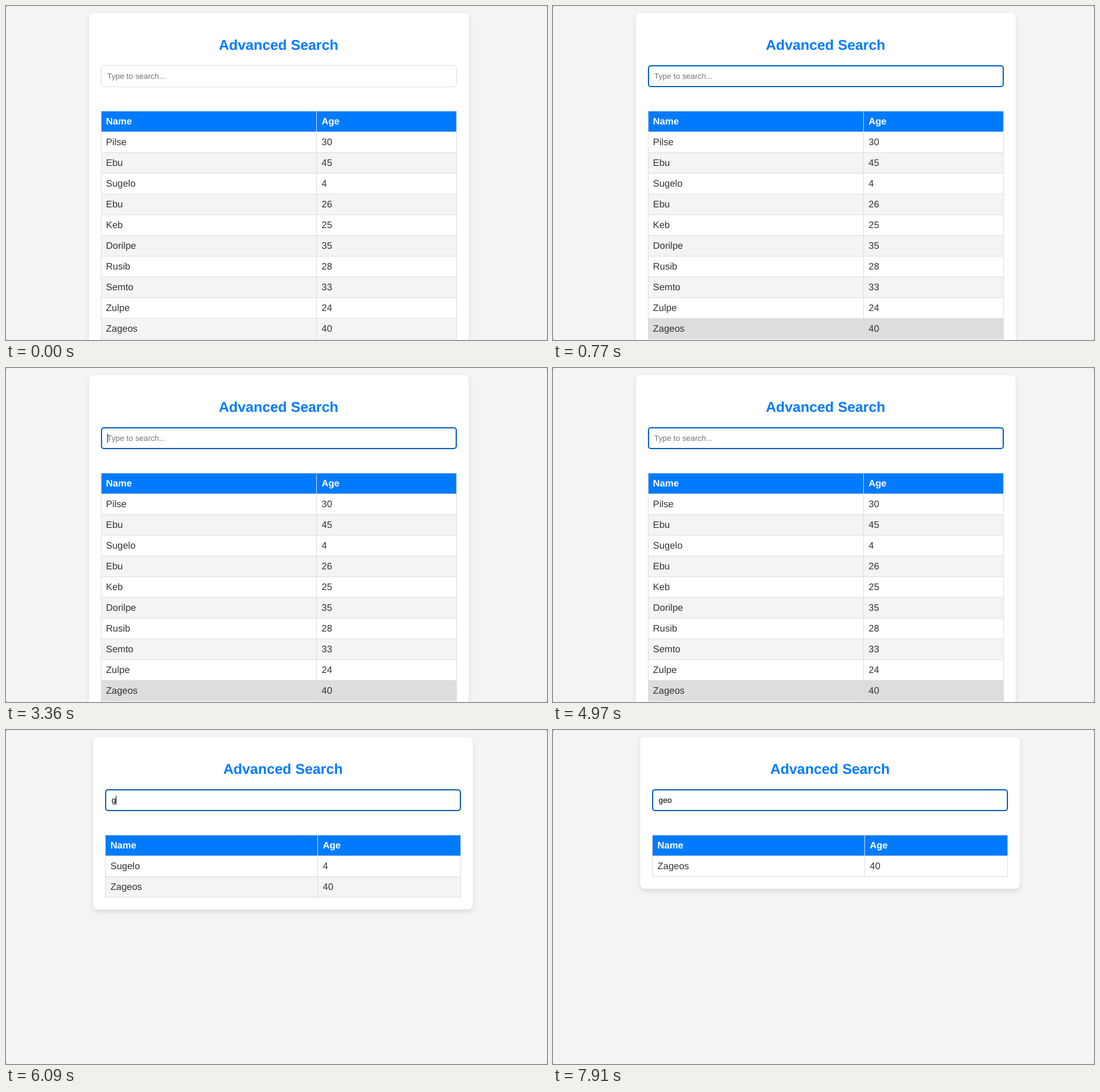
An HTML page for the animation above (8 s loop, 912 by 564 pixels).

```html
<!DOCTYPE html>
<html lang="en">
<head>
<meta charset="utf-8">
<title>Advanced Search</title>
<style>
  html, body { margin: 0; width: 100%; height: 100%; overflow: hidden; background: #777; }
  svg { display: block; width: 912px; height: 564px; font-family: Arial, "Liberation Sans", sans-serif; }
  text { white-space: pre; text-rendering: geometricPrecision; }
  .card { fill: #fff; filter: drop-shadow(0 4px 4px rgba(0, 0, 0, .1)); }
</style>
</head>
<body>
<svg id="stage" viewBox="0 0 912 564"></svg>
<script>
const LOOP = 8000, ROW = 35, TOP = 177;
const people = [
  ["Pilse", 30], ["Ebu", 45], ["Sugelo", 4], ["Ebu", 26], ["Keb", 25],
  ["Dorilpe", 35], ["Rusib", 28], ["Semto", 33], ["Zulpe", 24], ["Zageos", 40]
];
const FOCUS = 280, HOVER = [70, 350];
const typing = [[5110, "g"], [6930, "ge"], [7350, "geo"]];
// The caret flips at each of these times, starting hidden.
const blinks = [280, 770, 1260, 1820, 2310, 2800, 3360, 3850, 4410, 4970,
                5110, 5600, 6090, 6650, 6930, 7910];
const stage = document.getElementById("stage");

const rect = (x, y, w, h, fill, extra = "") =>
  `<rect x="${x}" y="${y}" width="${w}" height="${h}" fill="${fill}" ${extra}/>`;
const text = (x, y, str, size, fill, extra = "") =>
  `<text x="${x}" y="${y}" font-size="${size}" fill="${fill}" ${extra}>${str}</text>`;

function hoverFill(t) {
  const k = Math.min(1, Math.max(0, (t - HOVER[0]) / (HOVER[1] - HOVER[0])));
  const v = Math.round(244 + (221 - 244) * k);
  return `rgb(${v},${v},${v})`;
}

function table(x, tx, col, query, t) {
  const rows = people.filter(p => p[0].toLowerCase().includes(query));
  const bold = 'font-weight="700"';
  let out = rect(x, TOP, 600, ROW, "#007bff")
    + text(tx, TOP + 23, "Name", 16, "#fff", bold)
    + text(col + 9, TOP + 23, "Age", 16, "#fff", bold);
  rows.forEach(([name, age], i) => {
    const y = TOP + ROW * (i + 1);
    let fill = i % 2 ? "#f4f4f4" : "#fff";
    if (!query && i === 9) fill = hoverFill(t);
    out += rect(x, y, 600, ROW, fill)
      + text(tx, y + 23, name, 16, "#333")
      + text(col + 9, y + 23, age, 16, "#333");
  });
  const count = rows.length + 1, h = query ? count * ROW + 1 : 564 - TOP;
  for (let i = 0; i <= count; i++) out += rect(x, TOP + i * ROW, 600, 1, "#ddd");
  for (const lx of [x, col, x + 599]) out += rect(lx, TOP, 1, h, "#ddd");
  return { out, bottom: TOP + count * ROW + 1 };
}

function field(x, tx, query, t) {
  const on = t >= FOCUS;
  const color = !on ? "#ddd" : query ? "#0a5fb0" : "#005fc6";
  const w = on ? 2 : 1;
  let out = rect(x + w / 2, 100 + w / 2, 600 - w, 37 - w, "#fff",
    `rx="${on ? 4 : 4.5}" stroke="${color}" stroke-width="${w}"`);
  out += query
    ? text(tx, 123, query, 13.3333, "#000")
    : text(tx, 123, "Type to search...", 13.3333, "#757575");
  if (blinks.filter(b => t >= b).length % 2)
    out += rect(Math.floor(tx + .5 * !query + query.length * 7.415), 111, 1, 15, "#000");
  return out;
}

function scene(t) {
  const query = typing.reduce((q, [at, s]) => t >= at ? s : q, "");
  const left = query ? 147 : 139.5, x = Math.round(left) + 20;
  const grid = table(x, left + 29, query ? 525 : 523, query, t);
  const bottom = query ? grid.bottom + 20 : 640;
  return rect(0, 0, 912, 564, "#f4f4f4", 'rx="2.5"')
    + rect(x - 20, 12, 640, bottom - 12, "#fff", 'rx="8" class="card"')
    + text(left + 320, 74, "Advanced Search", 24, "#007bff", 'font-weight="700" text-anchor="middle"')
    + field(x, left + 31, query, t)
    + grid.out;
}

let last = "";
function draw(now) {
  const next = scene(now % LOOP);
  if (next !== last) stage.innerHTML = last = next;
  requestAnimationFrame(draw);
}
draw(performance.now());
</script>
</body>
</html>
```
